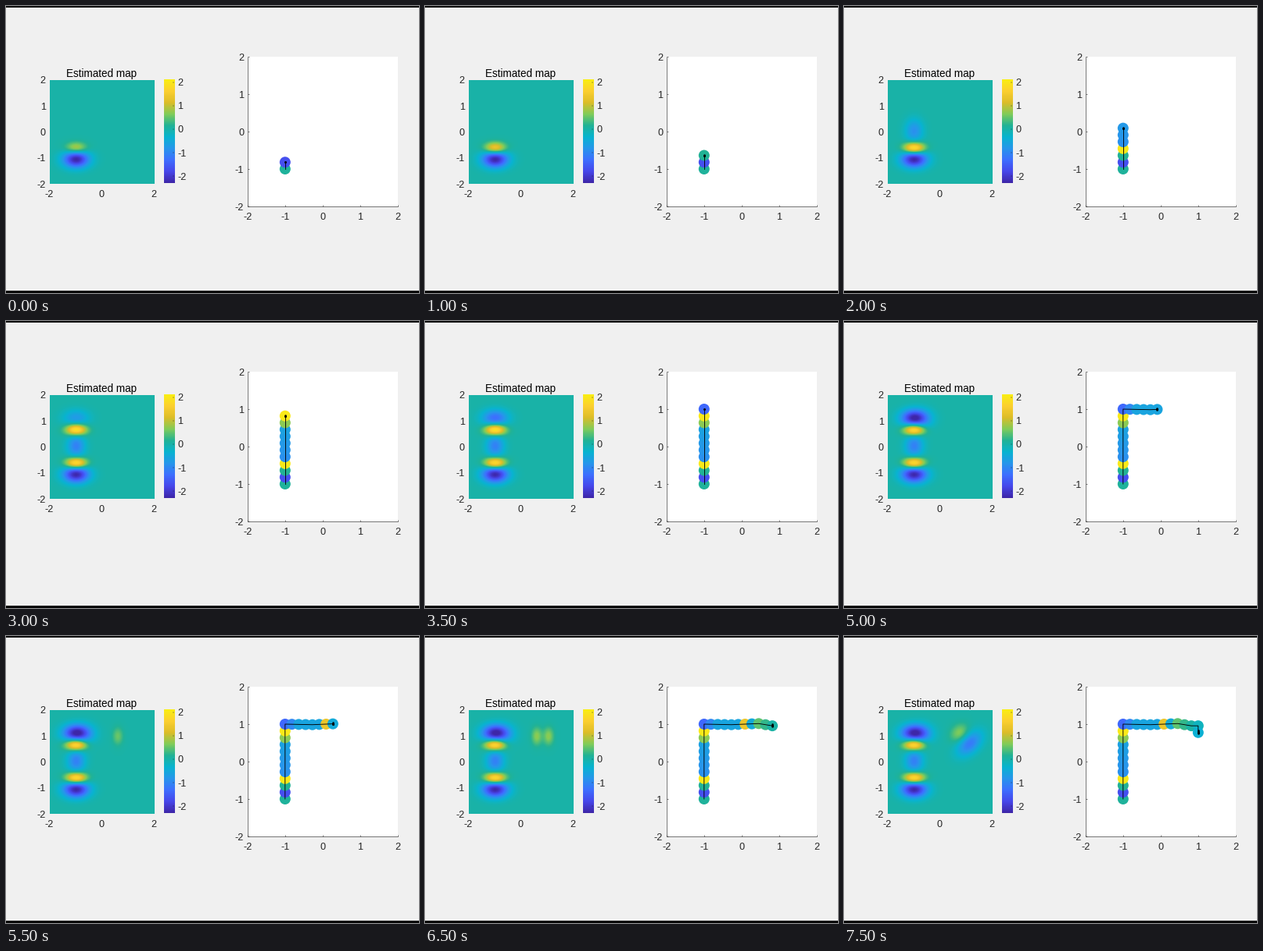
A matplotlib script that plays this animation: 528x368 px, repeating every 8000 ms.

```python
import numpy as np
import matplotlib.pyplot as plt
from matplotlib.animation import FuncAnimation
from matplotlib.colors import LinearSegmentedColormap
from matplotlib.patches import Rectangle

W, H, DPI = 528, 368, 100
PT = 72 / DPI
FRAMES = 16
LOW, HIGH = -2.3, 2.1
INK = "#262626"
plt.rcParams["font.family"] = "Liberation Sans"

PARULA = LinearSegmentedColormap.from_list("parula", [
    "#3e26a8", "#4747eb", "#3e6fff", "#2796eb", "#08b4d0",
    "#21b296", "#81cc59", "#dcbd29", "#fccf30", "#f9ee14"])

GX, GY = np.meshgrid(np.linspace(-2, 2, 134), np.linspace(2, -2, 134))


def grow(i, start, span):
    return np.clip((i - start) / span, 0, 1)


def progress(frame):
    """Number of the latest measurement; the robot slows down at corners."""
    return int(np.interp(frame, [0, 1, 2, 6, 8, 12, 15], [1, 1, 2, 10, 12, 20, 23]))


def to_plot(x, y):
    return 404.8 + 48 * x, 161 - 48 * y


# The robot drives up, turns right, then turns down.
STEPS = np.arange(24)
ROUTE = np.column_stack(to_plot(
    np.interp(STEPS, [11, 22], [-1, 1]),
    np.interp(STEPS, [0, 11, 15, 19, 21, 22, 23], [-1, 1, .985, 1.015, .955, .955, .775])))
READINGS = np.interp(STEPS, [0, 1, 3, 4, 8, 10, 11, 13, 16, 17, 18, 19, 23],
                     [.1, -1.7, 2, -.9, -.65, 2, -1.4, -.6, -.6, 1.35, -.5, .45, -.4])


def bump(x, y, sx, sy, tilt=0):
    c, s = np.cos(tilt), np.sin(tilt)
    u = c * (GX - x) + s * (GY - y)
    v = c * (GY - y) - s * (GX - x)
    return np.exp(-.5 * ((u / sx) ** 2 + (v / sy) ** 2))


def estimate(i):
    def column(y, sx, sy, height):
        # Each spot in the left column appears as the robot drives past it.
        return height * grow(i, 5.5 * y + 2.5, 4) * bump(-1, y, sx, sy)

    field = column(.04, .24, .32, -1.1)
    for side in (-1, 1):
        field += column(.65 * side + .02, .28, .155, 2.25)
        field += column(1.09 * side + .03, .35, .23, -2.3)
    field += -.35 * grow(i, 12, 5) * bump(-.6, 1.05, .3, .32)

    turned = grow(i, 21, 2)
    for x in (.6, 1.05):
        field += .7 * grow(i, 5.5 * x + 13.2, 2) * (1 - turned) * bump(x, 1, .14, .24)
    field += turned * (.7 * bump(.75, 1.12, .27, .22, np.pi / 4)
                       - 1.2 * bump(1.13, .72, .4, .25, np.pi / 4))
    return field


fig = plt.figure(figsize=(W / DPI, H / DPI), dpi=DPI, facecolor="#f0f0f0")
ax = fig.add_axes([0, 0, 1, 1])
ax.axis("off")


def label(x, y, text, ha="center", size=12.6, color=INK):
    ax.text(x, y, text, ha=ha, va="center_baseline", fontsize=size * PT, color=color)


def line(xs, ys, width=.6):
    ax.plot(xs, ys, color=INK, lw=width * PT, solid_capstyle="butt")


def box(x, y, w, h, color):
    ax.add_patch(Rectangle((x, y), w, h, fc=color, lw=0))


box(0, 0, W, 2, "black")
box(0, 365, W, 3, "black")
box(309, 65, 192, 192, "white")

heat = ax.imshow(estimate(1), cmap=PARULA, vmin=LOW, vmax=HIGH,
                 extent=(55.5, 189, 228, 95), interpolation="bilinear")
ax.imshow(np.linspace(HIGH, LOW, 256)[:, None], cmap=PARULA, vmin=LOW, vmax=HIGH,
          extent=(201.5, 215, 227.5, 94.5), aspect="auto")
label(122, 85, "Estimated map", size=13.5, color="black")
for n in range(-2, 3):
    bar_y = 158 - 30.2 * n
    if n % 2 == 0:
        label(122.3 + 33.4 * n, 240.7, str(n))
    label(51, 161.5 - 33.4 * n, str(n), "right")
    label(219.5, bar_y, str(n), "left")
    line([213, 215], [bar_y, bar_y], .4)
    x, y = to_plot(n, n)
    label(x, 269.3, str(n))
    label(304, y + .6, str(n), "right")
    line([x, x], [257, 255])
    line([309, 311], [y, y])
line([309, 309], [65, 257])
line([309, 501], [257, 257])

dots = ax.scatter([], [], s=(14 * PT) ** 2, linewidths=0, zorder=3)
trail, = ax.plot([], [], color="black", lw=.9 * PT, zorder=4)
cloud, = ax.plot([], [], color="black", lw=2.6 * PT, solid_capstyle="round", zorder=5)
robot, = ax.plot([], [], "o", color="black", ms=3 * PT, mew=0, zorder=5)
ax.set(xlim=(0, W), ylim=(H, 0), aspect="auto")


def draw(frame):
    i = progress(frame)
    seen = slice(i + 1)
    heat.set_data(estimate(i))
    dots.set_offsets(ROUTE[seen])
    dots.set_facecolor(PARULA((READINGS[seen] - LOW) / (HIGH - LOW)))
    trail.set_data(ROUTE[seen].T)
    x, y = ROUTE[i]
    spread = max(0, i - 13) * .25
    cloud.set_data([x, x], [y - spread - .5, y + spread * .5])
    robot.set_data([x], [y])
    return heat, dots, trail, cloud, robot


anim = FuncAnimation(fig, draw, frames=FRAMES, interval=500,
                     repeat=True, repeat_delay=0, blit=False)
plt.show()
```
